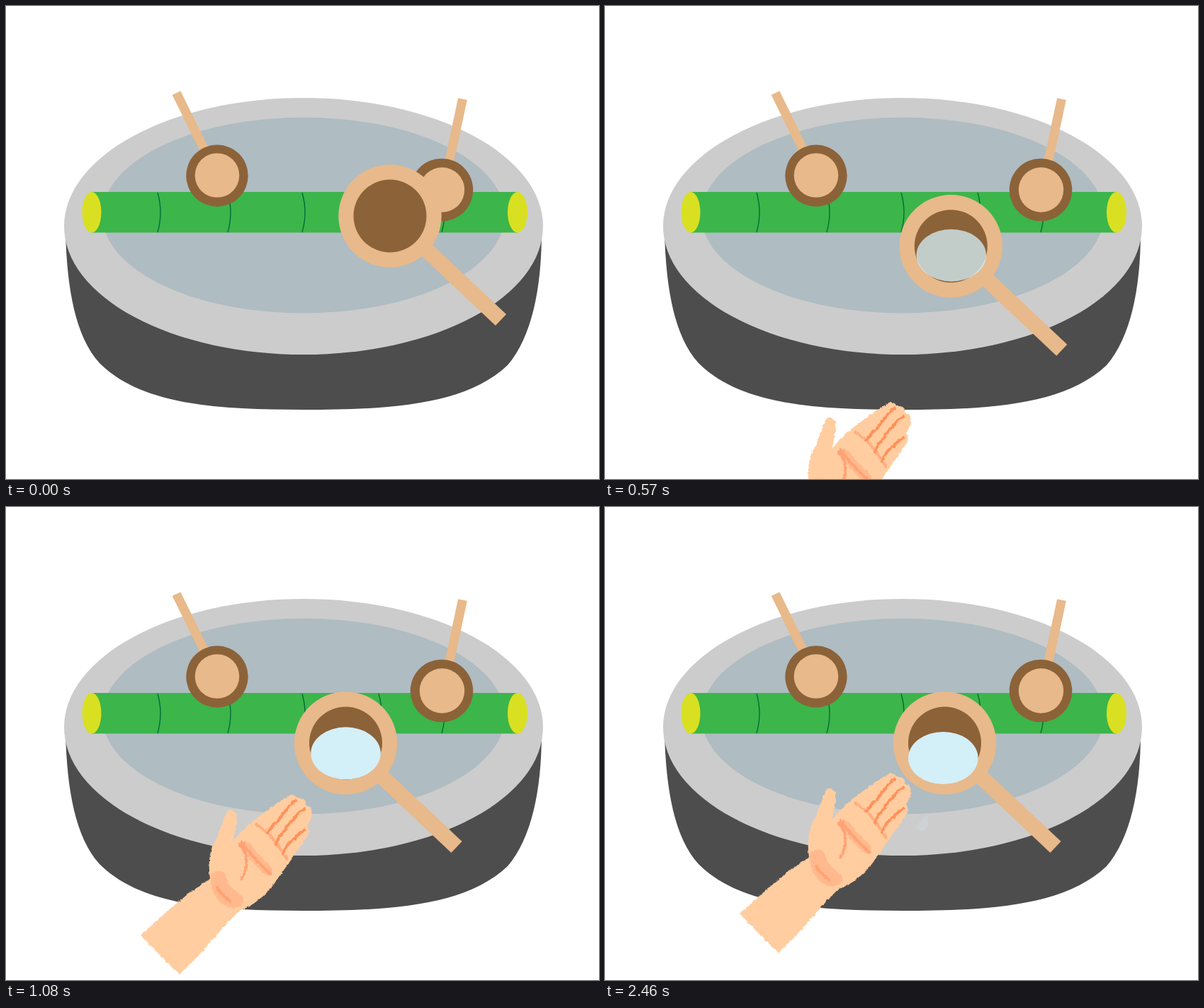
Write an HTML page that moves like this. It is 837 px wide and 669 px high and loops after 2.7 s.

```html
<!DOCTYPE html>
<html lang="en">
<head>
<meta charset="utf-8">
<title>Hand washing at a water basin</title>
<style>
  html, body { margin: 0; width: 100%; height: 100%; overflow: hidden; background: #fff; }
  svg { display: block; width: 837px; height: 669px; }
  .wood { fill: #e8b98a; }
  .bark { fill: #8c6239; }
  .handle { stroke: #e8b98a; stroke-width: 13; }
  .water { fill: #d3eff8; }
  .line { fill: none; stroke-linecap: round; stroke-linejoin: round; }
</style>
</head>
<body>
<svg viewBox="0 0 837 669">
  <defs>
    <filter id="rough" x="-5%" y="-5%" width="110%" height="110%">
      <feTurbulence type="fractalNoise" baseFrequency=".25" numOctaves="2" seed="4"/>
      <feDisplacementMap in="SourceGraphic" scale="4" xChannelSelector="R" yChannelSelector="G"/>
    </filter>
    <path id="drop" class="water" d="M7-12C8-4 9 3 5 8C1 13-6 12-8 7C-9 1 0-4 7-12Z"/>
    <path id="route" d="M542 297L526 349C522 361 508 353 488 339.5L479.5 334"/>
  </defs>

  <!-- basin -->
  <path fill="#4d4d4d" d="M84 320C86 400 98 468 132 505C192 565 300 571 420 571C540 571 648 565 708 508C742 468 756 400 756 320Z"/>
  <ellipse cx="420" cy="311.5" rx="338" ry="181.5" fill="#ccc"/>
  <ellipse cx="420" cy="296" rx="284" ry="138.5" fill="#afbcc2"/>

  <!-- bamboo -->
  <path fill="#3cb54a" d="M121 263H722V320.5H121Z"/>
  <path fill="none" stroke="#006837" stroke-width="1.3"
    d="M214 264q8 28 0 56M313 264q8 28 0 56M418 264q8 28 0 56M526 264q8 28 0 56M615 264q8 28 0 56"/>
  <g fill="#d9e021">
    <ellipse cx="121" cy="291.8" rx="13.5" ry="28.7"/>
    <ellipse cx="722" cy="291.8" rx="14" ry="28.7"/>
  </g>

  <!-- resting ladles -->
  <path class="handle" d="M240.5 123L298 240M644.5 131.5L617 260"/>
  <circle class="bark" cx="298" cy="240" r="43.7"/>
  <circle class="wood" cx="298" cy="239.5" r="31.3"/>
  <circle class="bark" cx="615" cy="260" r="44.3"/>
  <circle class="wood" cx="615.5" cy="260" r="31.7"/>

  <!-- moving ladle -->
  <g id="ladle">
    <path class="handle" style="stroke-width:22" d="M40 37L156.5 147"/>
    <circle class="wood" r="72.7"/>
    <circle class="bark" r="51.5"/>
    <ellipse id="fill" class="water" rx="49.3" ry="37"/>
  </g>

  <g id="hand">
    <g filter="url(#rough)">
      <path fill="#ffcda0" d="M190 576Q225 542 262 513L288 495Q284 468 292 447Q304 425 309 406Q313 396 319 398Q327 402 326 412L321 441Q337 421 360 405Q385 386 401 377Q408 375 411 381Q423 380 424 391Q432 394 432 405Q430 413 425 421Q430 427 425 435L405 465L385 493Q372 514 354 527Q343 536 330 540Q309 560 280 595L245 631Z"/>
      <path fill="#ffb98c" d="M290 488Q304 480 310 491Q314 508 330 517Q340 526 330 534Q314 542 299 525Q286 508 290 488Z"/>
      <g class="line">
        <path stroke="#ffb98c" stroke-width="14" d="M337 449Q352 467 369 483"/>
        <path stroke="#ffa274" stroke-width="4" d="M333 444Q348 466 374 489M330 446Q348 470 332 496M298 508Q305 519 316 527"/>
        <path stroke="#ffae7e" stroke-width="4" d="M353 418L371 432Q382 444 396 467"/>
        <path stroke="#ff915a" stroke-width="4" d="M409 385Q402 387 395 400Q388 405 384 414Q374 421 369 431M421 397Q412 401 406 412Q398 416 394 427Q384 435 381 447M421 427Q414 430 407 439Q395 446 391 460"/>
      </g>
    </g>
  </g>
  <g id="drops"></g>
</svg>
<script>
  const LOOP = 2700, LAST = 2460, STEP = 30;
  const $ = id => document.getElementById(id);
  const clamp = v => Math.min(1, Math.max(0, v));
  const ease = p => (1 - Math.cos(Math.PI * clamp(p))) / 2;
  const move = (el, x, y) => el.setAttribute('transform', `translate(${x} ${y})`);

  const drops = [
    { from: 1230, to: 2010, x: 444.8, y: 403.2, dx: -13.6, dy: 31.6 },
    { from: 1540, to: 2240, x: 438, y: 370, dx: -40, dy: 42 },
    { from: 1700, to: 2520, x: 464, y: 403.4, dx: -16.2, dy: 44.2 }
  ];
  for (const d of drops) {
    d.el = document.createElementNS('http://www.w3.org/2000/svg', 'use');
    d.el.setAttribute('href', '#drop');
    $('drops').append(d.el);
  }

  const route = $('route'), routeLength = route.getTotalLength();

  function draw(t) {
    const at = route.getPointAtLength(routeLength * ease(clamp(t / 744) ** .838));
    move($('ladle'), at.x, at.y);

    const drift = clamp((t - 800) / 1660);
    move($('fill'), .5 - 2.7 * drift, 13 + 8 * drift);
    $('fill').setAttribute('opacity', ease(t / 840));

    move($('hand'), 0, 293 * (1 - ease(t / 1365)));

    for (const d of drops) {
      const p = clamp((t - d.from) / (d.to - d.from)), e = ease(p);
      move(d.el, d.x + d.dx * e, d.y + d.dy * e);
      d.el.setAttribute('opacity', .9 * Math.sin(Math.PI * p));
    }
  }

  const start = performance.now();
  function tick() {
    const t = (performance.now() - start) % LOOP;
    draw(Math.min(LAST, Math.floor(t / STEP) * STEP));
    requestAnimationFrame(tick);
  }
  tick();
</script>
</body>
</html>
```
